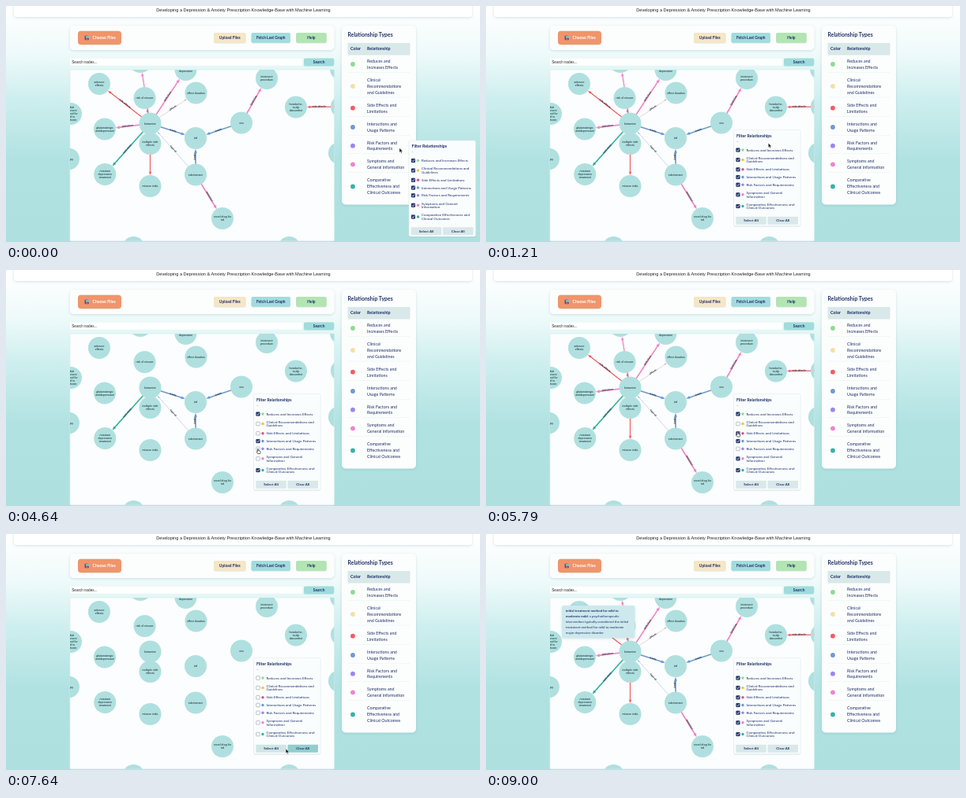
These frames come from a looping animation (600x300 px, 9.06 s). An HTML page:

```html
<!DOCTYPE html>
<html lang="en">
<head>
<meta charset="utf-8">
<title>Knowledge graph filter</title>
<style>
html, body { margin: 0; width: 100%; height: 100%; overflow: hidden; background: #b0e1e1; }
svg { display: block; width: 100vw; height: 100vh; }
text { font-family: Lato, "Open Sans", sans-serif; fill: #1d2f66; }
.bold { font-weight: 700; }
.mid { text-anchor: middle; }
.plain { font-family: "Liberation Sans", Arial, sans-serif; fill: #222; }
.node { font: 3.6px "Liberation Sans", Arial, sans-serif; fill: #10252c; text-anchor: middle; }
.link { font: 700 3.2px "Liberation Sans", Arial, sans-serif; fill: #2a2f3a; text-anchor: middle; }
</style>
</head>
<body>
<svg id="stage" viewBox="0 0 600 300" xmlns="http://www.w3.org/2000/svg"></svg>
<script>
const LOOP = 9060;
const stage = document.getElementById('stage');
const NODE_R = 14;

const types = [
  { color: '#8fdb92', lines: ['Reduces and', 'Increases Effects'], dot: 74, top: 72 },
  { color: '#f5dfa3', lines: ['Clinical', 'Recommendations', 'and Guidelines'], dot: 102, top: 96 },
  { color: '#ef5d62', lines: ['Side Effects and', 'Limitations'], dot: 129.7, top: 128 },
  { color: '#6b9bd1', lines: ['Interactions and', 'Usage Patterns'], dot: 154, top: 152 },
  { color: '#9a86ef', lines: ['Risk Factors and', 'Requirements'], dot: 177.7, top: 175.5 },
  { color: '#f084c6', lines: ['Symptoms and', 'General Information'], dot: 201.3, top: 199.3 },
  { color: '#36b2a2', lines: ['Comparative', 'Effectiveness and', 'Clinical Outcomes'], dot: 229.5, top: 223 }
];
const [REDUCES, CLINICAL, SIDE, USAGE, RISK, SYMPTOMS, OUTCOMES] = types.keys();

const filters = [
  { y: 25.5, lines: ['Reduces and Increases Effects'] },
  { y: 38, lines: ['Clinical Recommendations and', 'Guidelines'], color: '#f2c62f' },
  { y: 50.3, lines: ['Side Effects and Limitations'], color: '#ee4a78' },
  { y: 60, lines: ['Interactions and Usage Patterns'] },
  { y: 69.8, lines: ['Risk Factors and Requirements'] },
  { y: 82.3, lines: ['Symptoms and General', 'Information'] },
  { y: 97, lines: ['Comparative Effectiveness and', 'Clinical Outcomes'] }
];

const nodes = {
  adverse: [118, 99, 'adverse', 'effects'],
  top: [170, 71],
  depression: [227.5, 81, 'treatment for', 'depression'],
  misuse: [175.5, 117, 'risk of misuse'],
  duration: [240.5, 110.5, 'effect duration'],
  procedure: [330, 92, 'treatment', 'procedure'],
  headache: [367, 128.5, 'headache,', 'scalp', 'discomfort'],
  initial: [82, 137, 'initial', 'treatment', 'method for', 'mild to', 'moderate'],
  therapy: [79, 194.5, 'therapy'],
  ketamine: [182.5, 149.5, 'ketamine'],
  glutamate: [125, 156.5, 'glutamatergic', 'antidepressant'],
  trd: [240, 168, 'trd'],
  multiple: [182.5, 175, 'multiple side', 'effects'],
  vns: [298, 148.5, 'vns'],
  resistant: [125.3, 214, 'resistant', 'depression', 'treatment'],
  risks: [182.5, 229, 'misuse risks'],
  esketamine: [240, 214.5, 'esketamine'],
  novel: [274, 270, 'novel drug for', 'trd'],
  farTop: [424, 80],
  farMid: [425, 128],
  farLow: [422, 187],
  baseLeft: [161.5, 307],
  baseRight: [358.5, 307]
};

const edges = [
  ['ketamine', 'adverse', SIDE, 'side effects', 1.3],
  ['ketamine', 'misuse', SIDE, '', 1],
  ['ketamine', 'risks', SIDE, '', 1.2],
  ['ketamine', 'duration', SIDE, 'effects', .45, '#d3a9bd'],
  ['farMid', 'headache', SIDE, 'side effects', 1.3],
  ['ketamine', 'top', SYMPTOMS, '', 1.3],
  ['ketamine', 'depression', SYMPTOMS, 'definition', 1.6],
  ['ketamine', 'glutamate', SYMPTOMS, 'definition', 1.6],
  ['vns', 'procedure', SYMPTOMS, 'definition', 1.6],
  ['esketamine', 'novel', SYMPTOMS, 'definition', 1.6],
  ['ketamine', 'resistant', OUTCOMES, 'outcomes', 1.6],
  ['ketamine', 'trd', USAGE, 'treats', 1.6],
  ['vns', 'trd', USAGE, 'treats', 1.6],
  ['esketamine', 'trd', USAGE, 'treats', 1.6],
  ['esketamine', 'ketamine', USAGE, 'type of', .45, '#a6aad2'],
  ['farMid', 'farTop', USAGE, '', .6, '#68737d']
];

const rect = (x, y, w, h, fill, r = 0, extra = '') =>
  `<rect x="${x}" y="${y}" width="${w}" height="${h}" rx="${r}" fill="${fill}" ${extra}/>`;
const label = (x, y, size, str, cls = '') =>
  `<text x="${x}" y="${y}" font-size="${size}" class="${cls}">${str.replace('&', '&amp;')}</text>`;
const dot = (x, y, r, fill) => `<circle cx="${x}" cy="${y}" r="${r}" fill="${fill}"/>`;
const button = (x, y, w, h, fill, str, size = 4.9) =>
  rect(x, y, w, h, fill, 2, 'filter="url(#lift)"') +
  label(x + w / 2, y + h / 2 + size * .35, size, str, 'bold mid');

function drawNode([x, y, ...lines]) {
  const text = lines.map((s, i) =>
    `<text class="node" x="${x}" y="${y + 1.2 + (i - (lines.length - 1) / 2) * 4}">${s}</text>`);
  return dot(x, y, NODE_R, '#afe0df') + text.join('');
}

function drawEdge([from, to, type, str, width, tint]) {
  const [x1, y1] = nodes[from], [x2, y2] = nodes[to];
  const color = tint || types[type].color;
  const length = Math.hypot(x2 - x1, y2 - y1);
  const angle = Math.atan2(y2 - y1, x2 - x1) * 180 / Math.PI;
  const tip = length - NODE_R;
  const head = 2.6 + width * 1.4, half = .7 + width * .8;
  const flip = Math.abs(angle) > 90 ? ' rotate(180)' : '';
  return `<g data-type="${type}" transform="translate(${x1} ${y1}) rotate(${angle})">
    <path d="M0 0H${tip - head + 1}" stroke="${color}" stroke-width="${width}"/>
    <path d="M${tip} 0l${-head} ${-half}v${2 * half}z" fill="${color}"/>
    <text class="link" transform="translate(${length / 2} 0)${flip}" y=".4">${str}</text></g>`;
}

function drawLegend() {
  const rows = types.map((t, i) => {
    const last = t.top + (t.lines.length - 1) * 7.8;
    const rule = i < 6 ? rect(432.5, last + 4.2, 79, .4, '#dbe8ea') : '';
    return dot(439, t.dot, 2.9, t.color) + rule +
      t.lines.map((s, k) => label(457, t.top + k * 7.8, 5.35, s)).join('');
  });
  return rect(425, 25, 94, 227.5, '#fcfefe', 5, 'filter="url(#shadow)"') +
    label(432.5, 39, 6.9, 'Relationship Types', 'bold') +
    rect(432.5, 47, 79, 15.5, '#d9e8e8') +
    label(436, 56.3, 5.4, 'Color', 'bold') + label(457, 56.3, 5.4, 'Relationship', 'bold') +
    rows.join('');
}

function drawFilterPanel() {
  const rows = filters.map((f, i) =>
    rect(3.2, f.y - 2.3, 4.6, 4.6, '#fff', .8, 'stroke="#7b8490" stroke-width=".5"') +
    `<g data-tick="${i}">${rect(3, f.y - 2.5, 5, 5, '#26376d', .8)}
      <path d="M4 ${f.y}l1.2 1.3 2-2.7" fill="none" stroke="#fff" stroke-width=".7"/></g>` +
    dot(11.5, f.y, 1.7, f.color || types[i].color) +
    f.lines.map((s, k) =>
      label(16, f.y + 1.5 + (k - (f.lines.length - 1) / 2) * 4.6, 4.5, s)).join(''));
  return `<g id="panel">
    ${rect(0, 0, 84.5, 122, '#fafdfe', 2, 'filter="url(#lift)" stroke="#e1eaef" stroke-width=".5"')}
    ${label(3.5, 9.3, 5.25, 'Filter Relationships', 'bold')}
    ${label(3.5, 16.4, 4.2, '–')}${rows.join('')}
    ${rect(2.8, 110.3, 38.5, 10, '#d9e8e8', 1, 'id="selectAll"')}
    ${rect(43, 110.3, 38.5, 10, '#d9e8e8', 1, 'id="clearAll"')}
    ${label(22, 116.8, 4.5, 'Select All', 'bold mid')}
    ${label(62.2, 116.8, 4.5, 'Clear All', 'bold mid')}</g>`;
}

function drawTooltip() {
  const lines = ['intervention typically considered the initial',
    'treatment method for mild to moderate', 'major depressive disorder'];
  return `<g id="tooltip">${rect(96, 91, 92.5, 41, '#cde9ee', 2.5, 'filter="url(#shadow)"')}
    ${label(101, 99, 4.25, 'initial treatment method for mild to', 'bold')}
    <text x="101" y="106" font-size="4.25"><tspan class="bold">moderate mdd:</tspan> a psychotherapeutic</text>
    ${lines.map((s, i) => label(101, 113 + i * 7, 4.25, s)).join('')}</g>`;
}

stage.innerHTML = `
  <defs>
    <linearGradient id="sky" x1="0" y1="0" x2="0" y2="1">
      <stop offset="0" stop-color="#fff"/><stop offset=".2" stop-color="#effafa"/>
      <stop offset=".4" stop-color="#cdeeee"/><stop offset=".65" stop-color="#b1e2e2"/>
      <stop offset="1" stop-color="#afe0e0"/>
    </linearGradient>
    <filter id="shadow" x="-10%" y="-20%" width="120%" height="150%">
      <feDropShadow dx="0" dy="1" stdDeviation="1.5" flood-color="#406a70" flood-opacity=".2"/></filter>
    <filter id="lift" x="-10%" y="-20%" width="120%" height="150%">
      <feDropShadow dx="0" dy=".6" stdDeviation=".7" flood-color="#406a70" flood-opacity=".22"/></filter>
    <clipPath id="view"><rect x="81" y="81" width="334.5" height="217.8"/></clipPath>
  </defs>
  ${rect(0, 0, 600, 300, 'url(#sky)')}
  ${rect(10, -12, 580, 26, '#fff', 4, 'filter="url(#shadow)"')}
  ${label(300.5, 7, 5.62, 'Developing a Depression & Anxiety Prescription Knowledge-Base with Machine Learning', 'plain mid')}
  ${rect(81, 25, 334.5, 31, '#fcfefe', 5, 'filter="url(#shadow)"')}
  ${rect(91, 31.7, 55, 17.2, '#f0956a', 4, 'filter="url(#lift)"')}
  ${rect(99.6, 37.8, 5.2, 5.4, '#4d5878', .8)}${rect(101, 38.2, 4.6, 2.4, '#8fc7e0', .5)}${dot(102.4, 42, 1.1, '#e7677c')}
  <text x="109.5" y="42.2" font-size="5.2" class="bold" style="fill:#fff">Choose Files</text>
  ${button(263, 34, 40.5, 12.8, '#f5e6c6', 'Upload Files')}
  ${button(310.5, 34, 49.5, 12.8, '#a2dcdd', 'Fetch Last Graph')}
  ${button(367.2, 34, 38.6, 12.8, '#b3e4b3', 'Help')}
  ${rect(81, 66.8, 294, 9, '#fdfefe', 1.5)}
  ${label(83.3, 72.8, 4.57, 'Search nodes...', 'plain')}
  ${button(377, 66.5, 38.3, 9.6, '#9fdcdc', 'Search')}
  ${rect(81, 81, 334.5, 217.8, '#fcfdfe', 1.5, 'stroke="#d5eeee" stroke-width=".6"')}
  <g clip-path="url(#view)">${edges.map(drawEdge).join('')}${Object.values(nodes).map(drawNode).join('')}</g>
  ${drawLegend()}${drawTooltip()}${drawFilterPanel()}
  <g id="cursor">
    <path id="arrow" d="M0 0V5.8L1.4 4.6 2.3 6.7 3.3 6.3 2.4 4.3H4.2Z" fill="#111" stroke="#fff" stroke-width=".4"/>
    <path id="hand" d="M-.6 0Q0-.8.6 0V2.1L2.7 2.7Q3.3 3 3.1 4L2.6 6H-.5L-2.1 3.7Q-1.7 2.8-.6 3.6Z"
      fill="#fff" stroke="#111" stroke-width=".6"/>
  </g>`;

const find = id => document.getElementById(id);
const [panel, tooltip, cursor, arrow, hand, selectAll, clearAll] =
  ['panel', 'tooltip', 'cursor', 'arrow', 'hand', 'selectAll', 'clearAll'].map(find);
const links = [...document.querySelectorAll('[data-type]')];
const ticks = [...document.querySelectorAll('[data-tick]')];

// Each stop is [time, x, y]; motion eases between stops.
const cursorPath = [
  [0, 498, 180.5], [130, 564.5, 179], [180, 564.5, 179], [520, 384.5, 169], [720, 368, 165.3], [1000, 368, 165.3],
  [1700, 319, 206], [2200, 319, 206], [2480, 319, 195.5], [2850, 319, 195.5],
  [3300, 319, 238.5], [3950, 319, 238.5], [4450, 319, 227.5], [4800, 319, 227.5],
  [5030, 319, 238.5], [5220, 319, 238.5], [5560, 318.5, 206], [5900, 318.5, 206],
  [6450, 376, 271.5], [7450, 376, 271.5], [7640, 354.2, 273], [7800, 337, 271.5],
  [8360, 337, 271.5], [8720, 86, 136], [8850, 84, 136], [8985, -8, 130]
];
const panelPath = [[180, 510, 171], [520, 330, 162.8], [720, 313.5, 157.5]];

const clicks = [
  [2100, SIDE, false], [2640, CLINICAL, false], [3500, SYMPTOMS, false], [4600, RISK, false],
  [5130, SYMPTOMS, true], [5650, SIDE, true], [6900, 'all', false], [7950, 'all', true]
];

const ramp = (t, a, b) => {
  const u = Math.min(1, Math.max(0, (t - a) / (b - a)));
  return u * u * (3 - 2 * u);
};

function follow(path, t) {
  let [, x, y] = path[0];
  for (let i = 1; i < path.length; i++) {
    const u = ramp(t, path[i - 1][0], path[i][0]);
    x += (path[i][1] - path[i - 1][1]) * u;
    y += (path[i][2] - path[i - 1][2]) * u;
  }
  return [x, y];
}

function checkedAt(t) {
  const state = types.map(() => true);
  for (const [time, which, on] of clicks) {
    if (t < time) break;
    if (which === 'all') state.fill(on); else state[which] = on;
  }
  return state;
}

const mix = u => `rgb(${217 - 70 * u},${232 - 26 * u},${232 - 26 * u})`;
const show = (el, on) => el.setAttribute('visibility', on ? 'visible' : 'hidden');

function render(t) {
  const [px, py] = follow(panelPath, t);
  const [cx, cy] = follow(cursorPath, t);
  panel.setAttribute('transform', `translate(${px} ${py})`);
  cursor.setAttribute('transform', `translate(${cx} ${cy})`);

  const x = cx - px, y = cy - py;
  const overBox = x > 2 && x < 9 && filters.some(f => Math.abs(f.y - y) < 3.2);
  const overButton = y > 110 && y < 120.5 && x > 3 && x < 81.5 && (x < 40 || x > 43);
  show(hand, overBox || overButton);
  show(arrow, !(overBox || overButton));

  const state = checkedAt(t);
  links.forEach(el => show(el, state[el.dataset.type]));
  ticks.forEach((el, i) => show(el, state[i]));
  clearAll.setAttribute('fill', mix(ramp(t, 6320, 6450) * (1 - ramp(t, 7640, 7800))));
  selectAll.setAttribute('fill', mix(ramp(t, 7600, 7800) * (1 - ramp(t, 8380, 8520))));
  tooltip.setAttribute('opacity', ramp(t, 8680, 8760));
}

const start = performance.now();
function tick() {
  render((performance.now() - start) % LOOP);
  requestAnimationFrame(tick);
}
tick();
</script>
</body>
</html>
```
